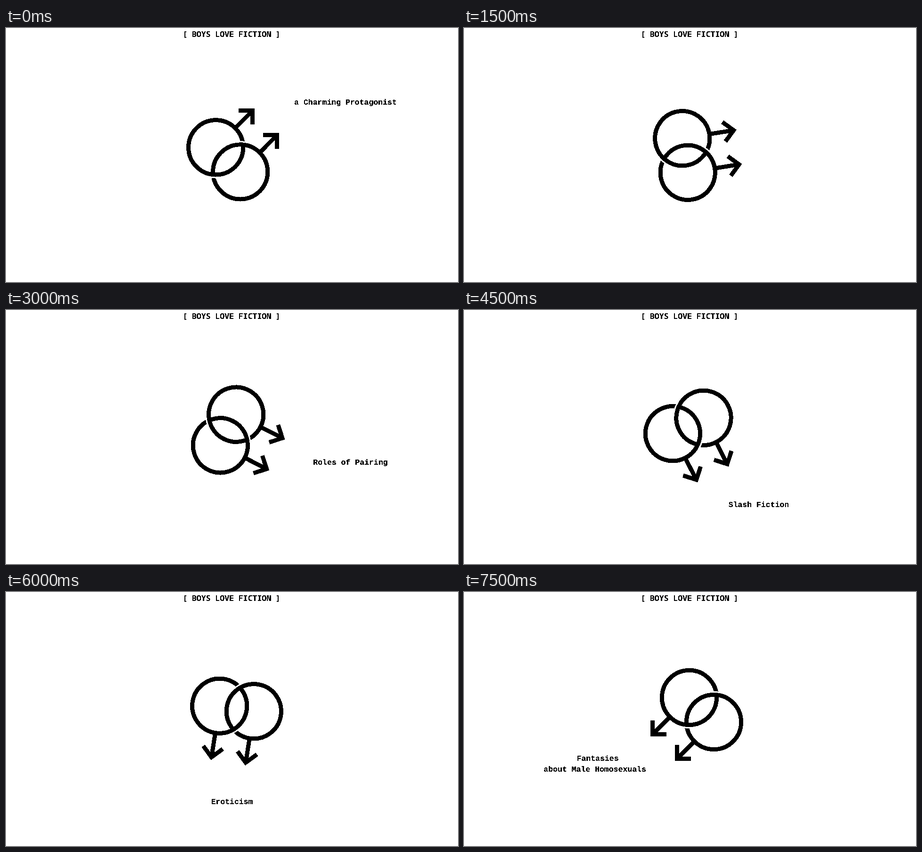
Write an HTML page that moves like this. It is 960x540 px and loops after 8 s.

```html
<!DOCTYPE html>
<html lang="en">
<head>
<meta charset="utf-8">
<title>Boys Love Fiction</title>
<style>
  html, body { margin: 0; width: 100%; height: 100%; overflow: hidden; background: #fff; }
  svg { display: block; width: 100%; height: 100%; }
  text { font: bold 16.5px "Liberation Mono", monospace; text-anchor: middle; }
  .title { font: 900 16.5px "Noto Sans Mono", monospace; }
  .ink { fill: none; stroke: #000; stroke-width: 9; }
  .gap { fill: none; stroke: #fff; stroke-width: 3; }
</style>
</head>
<body>
<svg viewBox="0 0 960 540">
  <defs>
    <!-- hard, two-tone edges for the lettering -->
    <filter id="crisp" filterUnits="userSpaceOnUse" x="0" y="0" width="960" height="540">
      <feComponentTransfer><feFuncA type="discrete" tableValues="0 0 1 1 1"/></feComponentTransfer>
    </filter>
    <g id="male" class="ink">
      <circle r="58.1"/>
      <path d="M0-58.1V-110M-20.9-89.4L0-110.3L20.9-89.4"/>
    </g>
    <path id="gap" class="gap" d="M-12.4-41.3A64.2 64.2 0 0 1 2.8-54.4"/>
  </defs>
  <g filter="url(#crisp)">
    <text class="title" x="479" y="19">[ BOYS LOVE FICTION ]</text>
    <g id="labels"></g>
  </g>
  <g id="pair" shape-rendering="crispEdges">
    <use href="#male" x="-36.8"/>
    <use href="#male" x="36.8"/>
    <!-- breaks that make the rings look interlinked -->
    <use href="#gap"/>
    <use href="#gap" transform="rotate(180)"/>
  </g>
</svg>
<script>
  const LOOP = 8000, STEP = 1500;

  // Centre of the linked rings and the text lines [text, middle x, baseline] for each step
  const poses = [
    { centre: [471.7, 279.9], lines: [["a Charming Protagonist", 721, 163]] },
    { centre: [469.5, 271], lines: [] },
    { centre: [472, 255], lines: [["Roles of Pairing", 731.5, 329]] },
    { centre: [476.2, 246], lines: [["Slash Fiction", 626, 419]] },
    { centre: [490, 248], lines: [["Eroticism", 480, 451]] },
    { centre: [504.5, 250.5], lines: [["Fantasies", 284, 358.5], ["about Male Homosexuals", 278, 381.5]] },
  ];

  const pair = document.getElementById("pair");
  const labels = document.getElementById("labels");
  let shown = -1;

  function show(step) {
    const { centre, lines } = poses[step];
    pair.setAttribute("transform", `translate(${centre}) rotate(${45 + 36 * step})`);
    labels.innerHTML = lines
      .map(([text, x, y]) => `<text x="${x}" y="${y}">${text}</text>`)
      .join("");
    shown = step;
  }

  function tick() {
    const step = Math.floor((performance.now() % LOOP) / STEP);
    if (step !== shown) show(step);
    requestAnimationFrame(tick);
  }
  tick();
</script>
</body>
</html>
```
